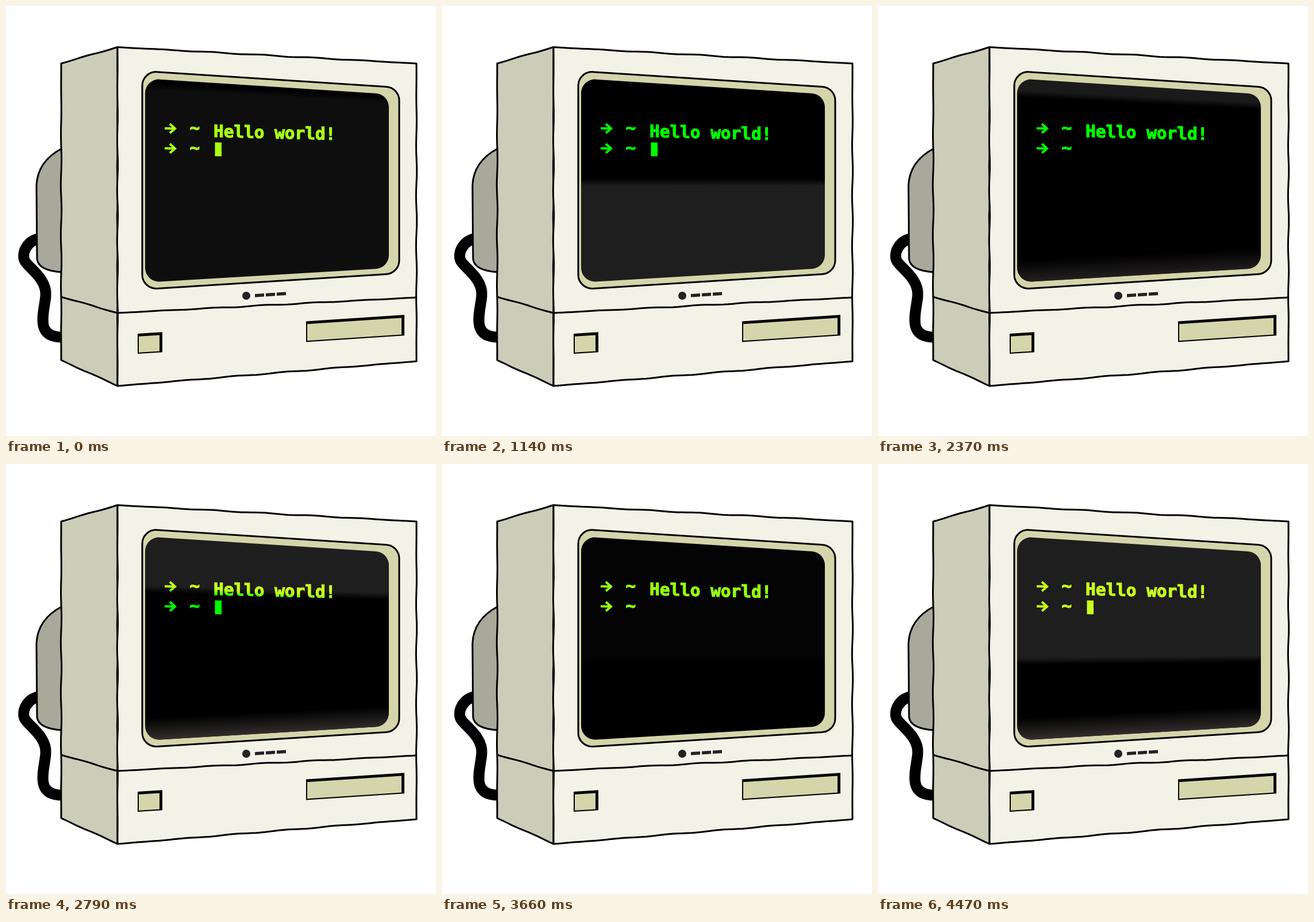
Write an HTML page with a canvas that moves like this. It is 748 px wide and 748 px high and loops after 4500 ms.

```html
<!DOCTYPE html>
<html>
<head>
<meta charset="utf-8">
<style>
html, body { margin: 0; height: 100%; overflow: hidden; background: #fff; }
canvas { display: block; }
</style>
</head>
<body>
<canvas id="stage" width="748" height="748"></canvas>
<script>
const ctx = document.getElementById('stage').getContext('2d');
const LOOP = 4500, STEP = 30;
const KHAKI = '#d5d5ab', INK = '#000', RISE = -0.066;
const clamp = (v, lo, hi) => Math.max(lo, Math.min(hi, v));
const rgb = (...c) => `rgb(${c.map(Math.round)})`;

const HUMP = new Path2D('M97 248 Q55 270 53 312 L54 440 Q56 460 97 463');
const CABLE = new Path2D('M60 404 C35 408 26 432 33 444 S72 475 69 505 S50 576 98 576');
const BEZEL = panel(237, 684, 113, 142, 493, 465, 24);
const SCREEN = panel(242, 666, 126, 153.5, 481, 456, 24);

// A rounded box seen in perspective: its left and right sides differ in height.
function panel(left, right, topLeft, topRight, bottomLeft, bottomRight, radius) {
  const path = new Path2D(), middle = (left + right) / 2;
  path.moveTo(middle, (topLeft + topRight) / 2);
  path.arcTo(right, topRight, right, bottomRight, radius);
  path.arcTo(right, bottomRight, left, bottomLeft, radius);
  path.arcTo(left, bottomLeft, left, topLeft, radius);
  path.arcTo(left, topLeft, middle, (topLeft + topRight) / 2, radius);
  path.closePath();
  return path;
}

function outline(path, fill) {
  ctx.fillStyle = fill;
  ctx.fill(path);
  ctx.stroke(path);
}

// A hand-drawn line that wavers slightly between its two ends.
function waver(path, x0, y0, x1, y1) {
  const length = Math.hypot(x1 - x0, y1 - y0);
  for (let d = 0; d < length; d += 8) {
    const k = d / length, nudge = 0.7 * Math.sin(d / 14 + x0) * Math.sin(Math.PI * k);
    path.lineTo(x0 + (x1 - x0) * k - nudge * (y1 - y0) / length,
                y0 + (y1 - y0) * k + nudge * (x1 - x0) / length);
  }
  path.lineTo(x1, y1);
}

// One upright face of the case, crossed by the seam above the drive.
function face(left, right, top0, top1, seam0, seam1, bottom0, bottom1, fill) {
  const path = new Path2D(), seam = new Path2D();
  waver(path, left, top0, right, top1);
  waver(path, right, top1, right, bottom1);
  waver(path, right, bottom1, left, bottom0);
  waver(path, left, bottom0, left, top0);
  path.closePath();
  outline(path, fill);
  waver(seam, left, seam0, right, seam1);
  ctx.stroke(seam);
}

function slot(x, y, w, h) {
  ctx.save();
  ctx.transform(1, RISE, 0, 1, x, y);
  ctx.fillStyle = INK;
  ctx.fillRect(0, 0, w, h);
  ctx.fillStyle = KHAKI;
  ctx.fillRect(2, 5, w - 7, h - 7);
  ctx.restore();
}

function drawCase() {
  ctx.fillStyle = '#fff';
  ctx.fillRect(0, 0, 748, 748);
  ctx.lineJoin = 'round';
  ctx.strokeStyle = INK;
  ctx.lineWidth = 19;
  ctx.stroke(CABLE);
  ctx.lineWidth = 3;
  outline(HUMP, '#a8a99a');
  face(96, 194, 100, 71.5, 506, 534, 616, 661, '#cbcdb9');
  face(194, 714, 71.5, 100, 534, 507, 661, 618, '#f2f2e6');
  outline(BEZEL, KHAKI);
  slot(229, 570, 43, 35);
  slot(522, 548.5, 171, 36);

  ctx.fillStyle = '#222';
  ctx.beginPath();
  ctx.arc(418, 504, 7, 0, 7);
  ctx.fill();
  ctx.save();
  ctx.transform(1, RISE, 0, 1, 433, 501);
  for (let i = 0; i < 3; i++) ctx.fillRect(19 * i, 0, 16, 5.5);
  ctx.restore();
}

// Light above the edge "upper" and below the edge "lower", darkness in between.
function light(lit, dark, upper, lower, slope) {
  const g = ctx.createLinearGradient(242, 100, 242 - slope * 400, 500);
  const stop = (y, color) => g.addColorStop(clamp((y - 100) / 400, 0, 1), color);
  stop(upper - 6, lit);
  stop(upper + 6, dark);
  stop(lower - 6, dark);
  stop(lower + 6, lit);
  return g;
}

function drawPrompt(y, slope, text, cursor) {
  ctx.save();
  ctx.transform(1, slope, 0, 1, 0, -242 * slope);
  ctx.font = 'bold 29.4px "DejaVu Sans Mono", monospace';
  ctx.strokeStyle = ctx.fillStyle;
  ctx.lineWidth = 4;
  ctx.lineJoin = 'miter';
  ctx.stroke(new Path2D(`M276 ${y} H294 M285 ${y - 8} L294 ${y} L285 ${y + 8}`));
  ctx.lineWidth = 1.2;
  for (const [word, x, dy] of [['~', 319.5, 8], [text, 361, 13]]) {
    ctx.fillText(word, x, y + dy);
    ctx.strokeText(word, x, y + dy);
  }
  if (cursor) ctx.fillRect(363.5, y - 12, 11.5, 24);
  ctx.restore();
}

function drawScreen(t) {
  const level = clamp(0.64 - 0.52 * Math.cos((t / STEP - 1.6) * Math.PI / 4), 0, 1);
  const lower = 139 + 0.147 * t;
  const upper = Math.min(343, 287 + 0.155 * (t - 3240));
  const edge = t < 2250 ? lower : upper;
  const slope = (25 - 48 * clamp((edge - 128) / 352, 0, 1)) / 424;
  const grey = 30 * level;

  ctx.save();
  ctx.clip(SCREEN);
  ctx.fillStyle = light(rgb(grey, grey, grey), '#000', upper, lower, slope);
  ctx.fillRect(242, 120, 424, 365);

  const sheen = ctx.createLinearGradient(242, 442, 244, 482);
  sheen.addColorStop(0, 'rgba(54,48,48,0)');
  sheen.addColorStop(1, `rgba(54,48,48,${level ** 3 * clamp((t - 2100) / 250, 0, 1)})`);
  ctx.fillStyle = sheen;
  ctx.fillRect(242, 400, 424, 85);

  const phase = t % 1500;
  ctx.fillStyle = light(rgb(140 + 60 * level, 255, 12 + 18 * level), '#0f0', upper, lower, slope);
  drawPrompt(212, 0.024, 'Hello world!', false);
  drawPrompt(247, 0.018, '', phase < 375 || phase >= 1125);
  ctx.restore();
}

function frame() {
  const t = Math.floor(performance.now() % LOOP / STEP) * STEP;
  drawCase();
  drawScreen(t);
  requestAnimationFrame(frame);
}
frame();
</script>
</body>
</html>
```
